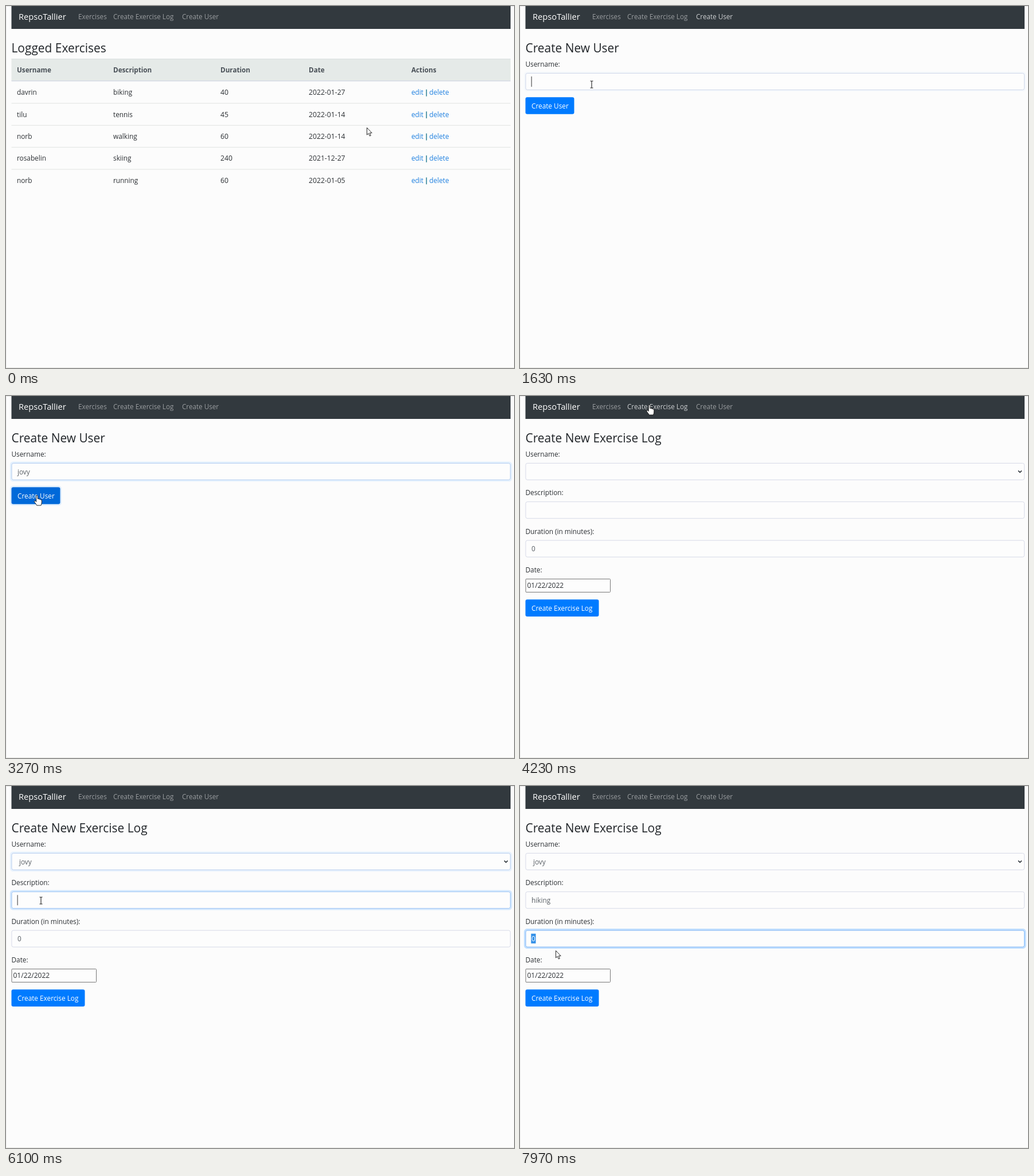
Animation, 886 px wide and 632 px high, one loop 8000 ms. Source, as an HTML page:

```html
<!DOCTYPE html>
<html lang="en">
<head>
<meta charset="utf-8">
<title>Exercise log</title>
<style>
  html, body { margin: 0; width: 100%; height: 100%; overflow: hidden; background: #fcfcfc; }
  svg { display: block; width: 100%; height: 100%; }
  text { font: 11.8px "Open Sans", "Noto Sans", sans-serif; fill: #2b2f33; white-space: pre; }
  .brand { font-size: 14.7px; fill: #fff; }
  .nav { font-size: 11.7px; fill: #999c9f; }
  .title { font-size: 20.9px; font-weight: 500; fill: #212529; }
  .head { font-size: 11.7px; font-weight: 700; fill: #495057; }
  .date { font-size: 12.2px; }
  .link { fill: #1f80e0; }
  .value { fill: #5a6066; }
  .label { fill: #fff; }
  .menu { filter: drop-shadow(0 2px 3px rgba(0, 0, 0, .35)); }
</style>
</head>
<body>
<svg id="stage" viewBox="0 0 886 632"></svg>
<script>
const LOOP = 8000;
const LEFT = 9.5, WIDE = 870.5;
const stage = document.getElementById('stage');

function add(parent, tag, attrs, content) {
  const node = document.createElementNS('http://www.w3.org/2000/svg', tag);
  set(node, attrs);
  if (content !== undefined) node.textContent = content;
  parent.appendChild(node);
  return node;
}
function set(node, attrs) {
  for (const key in attrs) node.setAttribute(key, attrs[key]);
}
const group = (parent = stage) => add(parent, 'g', {});
const rect = (parent, x, y, width, height, attrs) =>
  add(parent, 'rect', { x, y, width, height, ...attrs });
const text = (parent, x, y, content, cls = '') =>
  add(parent, 'text', { x, y, class: cls }, content);
const show = (node, on) => node.setAttribute('visibility', on ? 'inherit' : 'hidden');
const clamp = v => Math.max(0, Math.min(1, v));
const ease = v => v * v * (3 - 2 * v);

function field(parent, y) {
  const ring = rect(parent, LEFT - 1.3, y - 1.3, WIDE + 2.6, 32.2,
    { rx: 4, fill: 'none', stroke: '#bfdeff', 'stroke-width': 2.6 });
  const box = rect(parent, LEFT + .4, y + .4, WIDE - .8, 29,
    { rx: 3, fill: '#fdfdfd', stroke: '#d3d6e6', 'stroke-width': .9 });
  const edge = rect(parent, LEFT + .4, y + .4, WIDE - .8, 29,
    { rx: 3, fill: 'none', stroke: '#80bdff' });
  const value = text(parent, 20, y + 19.5, '', 'value');
  const caret = rect(parent, 20, y + 6, 1, 18, { fill: '#333' });
  return { ring, box, edge, value, caret };
}
function button(parent, y, width, caption) {
  const ring = rect(parent, LEFT - 1.2, y - 1.2, width + 2.4, 32,
    { rx: 4, fill: 'none', stroke: '#80bdff', 'stroke-width': 2.4, opacity: 0 });
  const face = rect(parent, LEFT, y, width, 29.6, { rx: 3.2, fill: '#007bff' });
  text(parent, 20, y + 19.6, caption, 'label');
  return { ring, face };
}

// Frame and navigation bar
rect(stage, 0, 0, 886, 632, { fill: '#fcfcfc' });
rect(stage, 0, 631, 886, 1, { fill: '#e6e6e2' });
rect(stage, 0, 0, 886, 1, { fill: '#e6e6e6' });
rect(stage, 0, 0, 1, 632, { fill: '#efefef' });
rect(stage, LEFT, 0, WIDE, 40, { fill: '#32393e' });
text(stage, 22, 24.2, 'RepsoTallier', 'brand');
const links = [
  [126, 175, 'Exercises'], [187, 295, 'Create Exercise Log'], [307, 372, 'Create User']
].map(([x, end, name]) => ({ x, end, node: text(stage, x, 23, name, 'nav') }));

// Exercise list
const list = group();
text(list, LEFT, 80.8, 'Logged Exercises', 'title');
rect(list, LEFT, 92, WIDE, 39, { fill: '#e5eae8' });
rect(list, LEFT, 92, WIDE, 1, { fill: '#dadfe0' });
rect(list, LEFT, 130, WIDE, 1.5, { fill: '#d5dae4' });
const columns = [19, 187, 374, 528, 707];
['Username', 'Description', 'Duration', 'Date', 'Actions']
  .forEach((name, i) => text(list, columns[i], 116, name, 'head'));
[
  ['davrin', 'biking', '40', '2022-01-27'],
  ['tilu', 'tennis', '45', '2022-01-14'],
  ['norb', 'walking', '60', '2022-01-14'],
  ['rosabelin', 'skiing', '240', '2021-12-27'],
  ['norb', 'running', '60', '2022-01-05']
].forEach((cells, row) => {
  const y = 155.2 + row * 38.4;
  cells.forEach((cell, i) => text(list, columns[i], y, cell, i > 1 ? 'date' : ''));
  text(list, 707, y, 'edit', 'link');
  rect(list, 732.6, y - 9.5, 1.5, 12, { fill: '#2a7f95' });
  text(list, 738.3, y, 'delete', 'link');
  if (row) rect(list, LEFT, y - 24.2, WIDE, 1, { fill: '#e0e3e2' });
});

// New user form
const userPage = group();
text(userPage, LEFT, 80.8, 'Create New User', 'title');
text(userPage, LEFT, 105.8, 'Username:');
const userField = field(userPage, 117);
const userButton = button(userPage, 159.2, 85, 'Create User');

// New log form
const logPage = group();
text(logPage, LEFT, 80.8, 'Create New Exercise Log', 'title');
['Username:', 'Description:', 'Duration (in minutes):', 'Date:']
  .forEach((name, i) => text(logPage, LEFT, 105.8 + i * 67.4, name));
const picker = field(logPage, 117);
picker.value.setAttribute('x', 23);
add(logPage, 'path', { d: 'M869 130.3l3 3 3-3', fill: 'none', stroke: '#343a40', 'stroke-width': 1.7 });
const about = field(logPage, 184.3);
const minutes = field(logPage, 251.7);
const marked = rect(logPage, 19.3, 257.8, 8.2, 17, { fill: '#3390e8' });
minutes.value.textContent = '0';
logPage.appendChild(minutes.value);
rect(logPage, 10, 319.5, 147.5, 23, { rx: 1, fill: '#fdfdfd', stroke: '#777' });
text(logPage, 12.5, 335.3, '01/22/2022').style.fontSize = '12px';
const logButton = button(logPage, 355.3, 128, 'Create Exercise Log');

const people = ['norb', 'davrin', 'jovy', 'sodri', 'tilu', 'osk', 'rosabelin', 'drel', 'velam', 'pelro'];
const PITCH = 17.27, MENU_TOP = 147.6;
const menu = add(logPage, 'g', { class: 'menu' });
rect(menu, 10, 147, 869.5, 173.5, { fill: '#fdfdfd', stroke: '#7d8186' });
const bar = rect(menu, 10.5, MENU_TOP, 868.5, PITCH, { fill: '#2892f3' });
const options = people.map((name, i) => text(menu, 23, 160.5 + i * PITCH, name, 'value'));

// Pointer shapes, drawn around their hot spots
const pointer = group();
const ink = { fill: '#fff', stroke: '#111', 'stroke-width': .9, 'stroke-linejoin': 'round' };
const shapes = {
  arrow: add(pointer, 'path', {
    d: 'M.5 .5V13L3.3 10.4 5.3 15 7.3 14.1 5.4 9.7H9.2Z', ...ink }),
  hand: add(pointer, 'path', {
    d: 'M-1.3 10.6V.8Q-1.2-.5 0-.5T1.3 .8V5.6Q3.4 4.8 3.9 6.2 5.6 5.5 6.2 7 8.3 6.7 8.3 8.8V12Q8.2 14 7 17H-.2Q-1.6 14.5-4.3 11.2-5.2 9.6-3.9 8.8-2.8 8.5-1.3 10.6Z', ...ink }),
  beam: add(pointer, 'path', {
    d: 'M-2.5-6H-.8L0-5.4 .8-6H2.5M0-5.4V5.4M-2.5 6H-.8L0 5.4 .8 6H2.5',
    fill: 'none', stroke: '#222', 'stroke-width': 1.1 })
};

// Pointer stops: time, x, y
const path = [
  [0, 629, 212], [250, 629, 212], [930, 340, 17], [1130, 340, 17], [1520, 125, 137],
  [2550, 125, 137], [3020, 54, 174], [3450, 54, 174], [3980, 225.5, 16], [4320, 225.5, 16],
  [4720, 50, 134], [4920, 50, 134], [5140, 50, 179], [5200, 50, 179], [5340, 49, 191],
  [5570, 49, 191], [5930, 61, 200], [7280, 61, 200], [7850, 62, 287], [LOOP, 62, 287]
];
function pointerAt(t) {
  const i = path.findIndex(stop => stop[0] > t);
  const [t0, x0, y0] = path[i - 1], [t1, x1, y1] = path[i];
  const k = ease((t - t0) / (t1 - t0));
  return [x0 + (x1 - x0) * k, y0 + (y1 - y0) * k];
}

const within = (v, from, to) => v >= from && v < to;
const typed = (word, t, start, step) => word.slice(0, Math.max(0, Math.floor((t - start) / step) + 1));

function focus(item, t, from, to) {
  const glow = clamp((t - from) / 150) - clamp((t - to) / 150);
  item.ring.setAttribute('opacity', glow);
  if (item.edge) item.edge.setAttribute('opacity', glow);
}
function blink(item, t, from, to, lastKey) {
  const since = t - (t > lastKey ? lastKey : from);
  show(item.caret, within(t, from, to) && since % 1060 < 530);
  item.caret.setAttribute('x', 19.6 + item.value.getComputedTextLength());
}

function draw(t) {
  const [x, y] = pointerAt(t);
  const onList = t < 1080, onUser = within(t, 1080, 4130), onLog = t >= 4130;
  show(list, onList);
  show(userPage, onUser);
  show(logPage, onLog);

  const held = [false, within(t, 4130, 4800), within(t, 1050, 1640)];
  let overLink = false;
  links.forEach((link, i) => {
    const hover = within(x, link.x, link.end) && within(y, 8, 32);
    overLink = overLink || hover;
    link.node.style.fill = hover || held[i] ? '#ccced0' : '#999c9f';
  });

  userField.value.textContent = t < 3340 ? typed('jovy', t, 1900, 150) : '';
  focus(userField, t, 1615, 3180);
  blink(userField, t, 1615, 3200, 2350);
  const overButton = onUser && within(x, LEFT, 94.5) && within(y, 159, 189);
  userButton.face.setAttribute('fill', overButton ? '#0069d9' : '#007bff');
  focus(userButton, t, 3235, 4130);

  const open = within(t, 4800, 5500);
  picker.value.textContent = t < 4400 ? '' : t < 5500 ? people[0] : people[2];
  focus(picker, t, 4800, 6000);
  show(picker.caret, false);
  show(menu, open);
  const pick = Math.max(0, Math.floor((y - MENU_TOP) / PITCH));
  bar.setAttribute('y', MENU_TOP + pick * PITCH);
  options.forEach((option, i) => { option.style.fill = i === pick ? '#fff' : ''; });

  about.value.textContent = typed('hiking', t, 6500, 120);
  focus(about, t, 6000, 7650);
  blink(about, t, 6000, 7650, 7100);

  const selected = t >= 7650;
  focus(minutes, t, 7650, LOOP + 200);
  show(minutes.caret, false);
  show(marked, selected);
  minutes.value.style.fill = selected ? '#fff' : '';

  const inField = !open && (
    onUser && within(y, 117, 147) ||
    onLog && (within(y, 184, 214) || within(y, 252, 281)));
  const kind = overLink || overButton ? 'hand' : inField ? 'beam' : 'arrow';
  for (const name in shapes) show(shapes[name], name === kind);
  pointer.setAttribute('transform', `translate(${x} ${y})`);
  show(pointer, !within(t, 1880, 2550) && !within(t, 6480, 7260));
  if (within(t, 1880, 2550) || within(t, 6480, 7260))
    for (const name in shapes) show(shapes[name], false);
}

let start;
function tick(now) {
  if (start === undefined) start = now;
  draw((now - start) % LOOP);
  requestAnimationFrame(tick);
}
draw(0);
requestAnimationFrame(tick);
</script>
</body>
</html>
```
